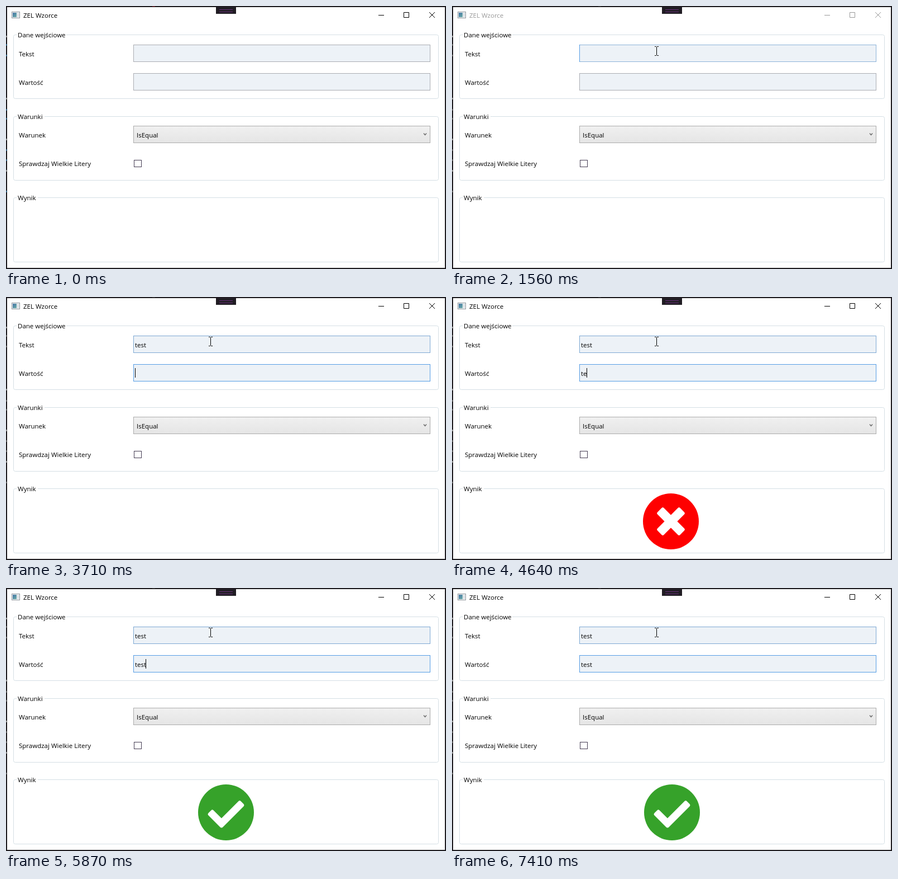
Animation, 788 px wide and 470 px high, one loop 8 s. Source, as an HTML page:

```html
<!DOCTYPE html>
<html lang="pl">
<head>
<meta charset="utf-8">
<title>ZEL Wzorce</title>
<style>
html, body { margin: 0; width: 100%; height: 100%; overflow: hidden; background: #fff; }
svg { display: block; }
text { font: 11.5px "Open Sans", "Noto Sans", sans-serif; fill: #000; white-space: pre; }
.group { fill: none; stroke: #d5dfe5; }
.field { fill: #edf2f7; stroke: #abadb3; }
.thin { fill: none; stroke: #000; }
</style>
</head>
<body>
<svg width="788" height="470" viewBox="0 0 788 470">
  <defs>
    <linearGradient id="button" x2="0" y2="1">
      <stop stop-color="#f0f0f0"/><stop offset="1" stop-color="#e5e5e5"/>
    </linearGradient>
    <linearGradient id="pane" x2="1" y2="1">
      <stop stop-color="#3f6fa3"/><stop offset="1" stop-color="#6fb0a8"/>
    </linearGradient>
  </defs>
  <rect width="788" height="470" fill="#1e1c20"/>
  <g id="specks"></g>
  <rect x="2" y="2" width="784" height="466" fill="#fff"/>

  <rect x="376" width="36" height="14" fill="#211d24"/>
  <path d="M382 6.5h24M382 10.5h24" stroke="#68307a"/>

  <rect x="10.5" y="10.5" width="14" height="11" fill="#f4f6f8" stroke="#8e959b"/>
  <rect x="12" y="12" width="7" height="8" fill="url(#pane)"/>
  <path d="M20.5 12v8M22.5 12v8" stroke="#c9d0d6"/>
  <text id="title" x="31" y="21">ZEL Wzorce</text>
  <path id="buttons" class="thin" d="M667 16.5h10M712.5 11.5h9v9h-9zM758 11l10 10M768 11l-10 10"/>

  <g id="groups"></g>
  <text x="23" y="90">Tekst</text>
  <text x="23" y="141">Wartość</text>
  <text x="23" y="235">Warunek</text>
  <text x="23" y="286">Sprawdzaj Wielkie Litery</text>

  <rect id="box1" class="field" x="228.5" y="69.5" width="531" height="30"/>
  <path id="edge" d="M228.5 69v31" stroke="#569de5"/>
  <rect id="box2" class="field" x="228.5" y="120.5" width="531" height="30"/>
  <text id="text1" x="231" y="90"></text>
  <text id="text2" x="231" y="141"></text>
  <rect id="caret" width="1" height="17"/>

  <rect x="228.5" y="214.5" width="531" height="30" fill="url(#button)" stroke="#acacac"/>
  <text x="234" y="235">IsEqual</text>
  <path d="M748 227.5l2.5 3 2.5-3" fill="none" stroke="#606060" stroke-width="1.2"/>
  <rect x="229.5" y="275.5" width="13" height="12" fill="#fff" stroke="#453c52"/>

  <g id="wrong">
    <circle r="50" fill="#fe0000"/>
    <g fill="#fff">
      <rect x="-28.6" y="-8" width="57.2" height="16" rx="2.8" transform="rotate(45)"/>
      <rect x="-28.6" y="-8" width="57.2" height="16" rx="2.8" transform="rotate(-45)"/>
    </g>
  </g>
  <g id="right">
    <circle r="50" fill="#36a22a"/>
    <path transform="scale(.2016) translate(-256 -256)" fill="#fff" stroke="#fff" stroke-width="32"
      stroke-linejoin="round" d="M112 272L134.6 249.4 216 330.7 377.4 169.3 400 192 216 376z"/>
  </g>

  <path id="beam" class="thin" d="M-3.5-8h2.5l1 1 1-1h2.5M0-7v14M-3.5 8h2.5l1-1 1 1h2.5"/>
  <path id="arrow" fill="#fff" stroke="#000" d="M0 0v16l4-4 3 6 2-1-3-6h5z"/>
</svg>
<script>
const LOOP = 8000;
const $ = id => document.getElementById(id);
const set = (id, attrs) => {
  for (const k in attrs) $(id).setAttribute(k, attrs[k]);
};
const show = (id, on) => set(id, { visibility: on ? "visible" : "hidden" });
const within = (t, spans) => spans.some(([a, b]) => t >= a && t < b);

// Value of the last [time, value] step that has begun.
const held = (steps, t, first) =>
  steps.reduce((v, [at, next]) => t >= at ? next : v, first);

const WORD = "test";
const caretX = [231, 235, 241, 246, 250];
const typed1 = [[2510, 1], [2580, 2], [2780, 3], [2910, 4]];
const typed2 = [[4510, 1], [4640, 2], [5400, 3], [5870, 4]];
const caretOn = [[1700, 2230], [2510, 3510], [3710, 4310], [4510, 5200], [5400, 6410], [6880, 7410]];
const shake = [[4580, -6], [4640, -2], [4710, 6], [4780, -3], [4920, 0]];
const beat = [[5940, 1.15], [6010, 1.3], [6080, 1.15], [6200, 1],
  [6340, 1.3], [6410, 1.2], [6480, 1.1], [6550, 1]];

$("groups").innerHTML = [
  ["Dane wejściowe", 51, 114, 108],
  ["Warunki", 197, 114, 69],
  ["Wynik", 342, 115, 57]
].map(([name, y, h, end]) =>
  `<rect class="group" x="13.5" y="${y + .5}" width="761" height="${h}" rx="3"/>
   <rect x="19" y="${y - 1}" width="${end - 19}" height="3" fill="#fff"/>
   <text x="21" y="${y + 5}">${name}</text>`).join("");

$("specks").innerHTML = [53, 68, 87, 164, 184, 200, 237, 256, 274, 293, 330].map((y, i) =>
  `<rect y="${y}" width="1.5" height="3" fill="${i % 3 ? "#3b7ba8" : "#a9a9a9"}"/>`).join("") +
  `<rect x="262" width="5" height="1" fill="#8c2630"/>`;

function pointer(t) {
  const p = Math.min(1, Math.floor((t - 1070) / 70) / 7);
  const e = 1 - (1 - p) ** 2;
  const x = Math.round(788 - 421 * e) - .5;
  const y = t >= 1700 ? 79 : Math.round(205 - 125 * e);
  const inBox = x > 228 && x < 760 && (y > 69 && y < 100 || y > 120 && y < 151);
  const seen = t >= 1070 && t < 2510 || t >= 3710;
  show("beam", seen && inBox);
  show("arrow", seen && !inBox);
  const transform = `translate(${x} ${y + .5})`;
  set("beam", { transform });
  set("arrow", { transform });
  return inBox && y < 100;
}

function draw(t) {
  const idle = t >= 210 && t < 1700;
  const second = t >= 3710;
  $("title").style.fill = idle ? "#999" : "#000";
  $("buttons").style.stroke = idle ? "#999" : "#000";
  $("specks").style.filter = t < 210 ? "none" : "grayscale(1)";

  const hover = pointer(t) && t >= 1070;
  $("box1").style.stroke = second ? "#7ea9d4" : t >= 1700 ? "#7f99b3" : hover ? "#8db3d9" : "#abadb3";
  $("box2").style.stroke = second ? "#569de5" : "#abadb3";
  show("edge", hover && !second);

  const n1 = held(typed1, t, 0), n2 = held(typed2, t, 0);
  $("text1").textContent = WORD.slice(0, n1);
  $("text2").textContent = WORD.slice(0, n2);
  set("caret", { x: caretX[second ? n2 : n1], y: second ? 127 : 76 });
  show("caret", within(t, caretOn));

  show("wrong", t >= 4510 && t < 5870);
  show("right", t >= 5870);
  set("wrong", { transform: `translate(${394 + held(shake, t, 0)} 401)` });
  set("right", { transform: `translate(394 401) scale(${held(beat, t, 1)})` });
}

function tick() {
  draw(performance.now() % LOOP);
  requestAnimationFrame(tick);
}
tick();
</script>
</body>
</html>
```
